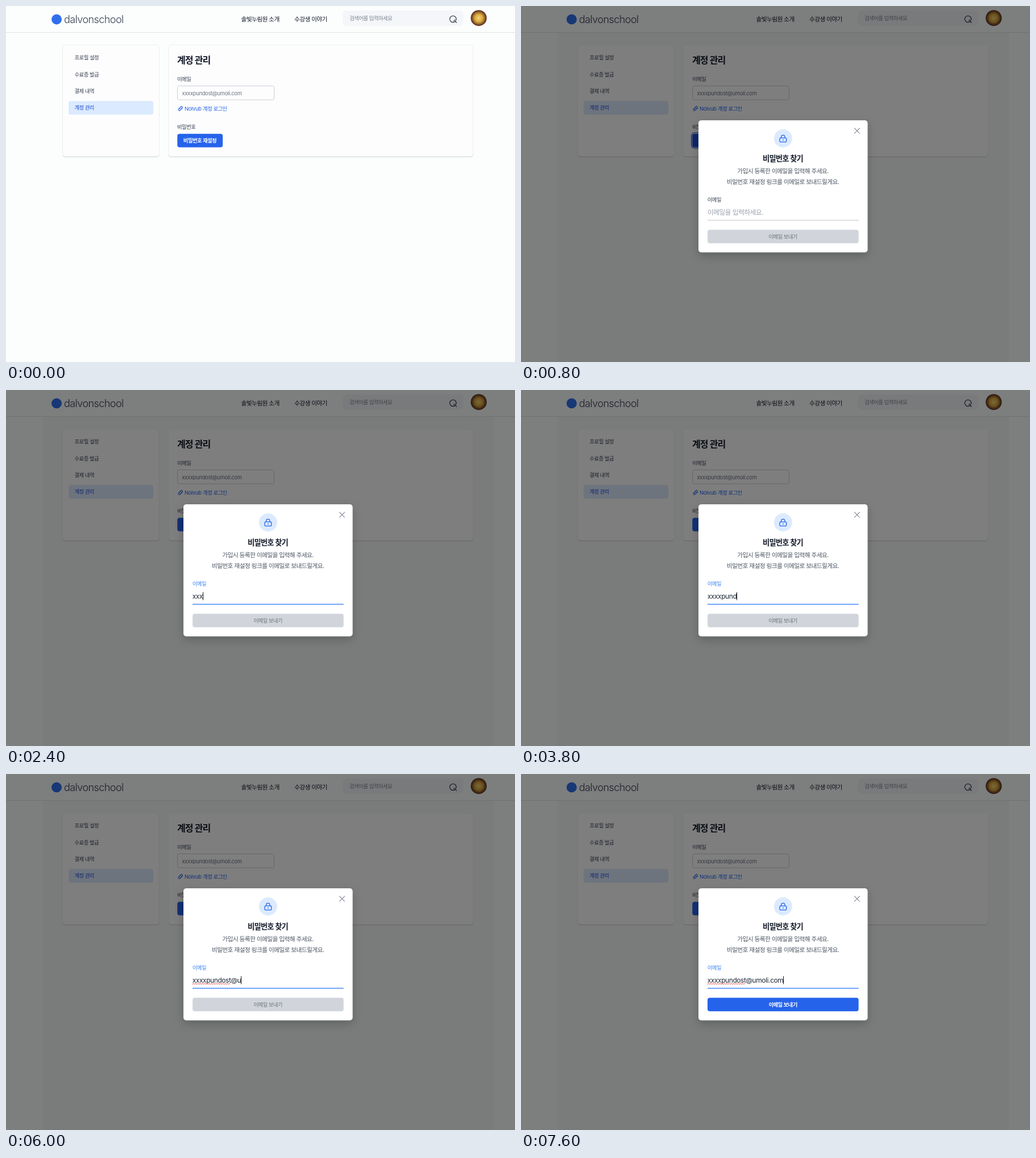
These frames come from a looping animation (895x626 px, 8 s). An HTML page:

```html
<!DOCTYPE html>
<html lang="ko">
<head>
<meta charset="utf-8">
<title>계정 관리</title>
<style>
html, body { margin: 0; width: 100%; height: 100%; overflow: hidden; background: #fcfdfd; }
svg { display: block; width: 895px; height: 626px; }
text {
  font: 9.35px Inter, "Noto Sans CJK KR", "Noto Sans CJK", sans-serif;
  letter-spacing: -.053em; fill: #374151;
}
.latin { letter-spacing: -.031em; }
.nav { font-size: 10.7px; font-weight: 500; fill: #111827; }
.desc { font-size: 10.7px; fill: #4b5563; }
.label { font-weight: 500; }
.bold { font-weight: 700; fill: #111827; }
.field { font-size: 11.9px; }
.mid { text-anchor: middle; }
.card { fill: #fdfdfe; stroke: #eeeff2; filter: drop-shadow(0 1px .5px #0002); }
.line { fill: none; stroke-linecap: round; stroke-linejoin: round; }
.modal { fill: #fff; filter: drop-shadow(0 6px 8px #0003); }
</style>
</head>
<body>
<svg viewBox="0 0 895 626">
  <defs>
    <radialGradient id="avatar">
      <stop offset="0" stop-color="#f1d677"/>
      <stop offset=".5" stop-color="#d9a63c"/>
      <stop offset="1" stop-color="#51261d"/>
    </radialGradient>
  </defs>
  <rect width="895" height="626" fill="#fcfdfd"/>
  <rect id="column" x="65" y="47" width="793" height="579" fill="#000" opacity=".025"/>

  <!-- header -->
  <path d="M0 46.5H895" stroke="#dfe1e5"/>
  <circle cx="89" cy="23.5" r="9" fill="#2f6fed"/>
  <text class="latin" x="102" y="29.5" style="font-size:18px;font-weight:300">dalvonschool</text>
  <text class="nav" x="413.5" y="26.5">솔빛누림원 소개</text>
  <text class="nav" x="507" y="26.5">수강생 이야기</text>
  <rect x="592" y="8" width="212" height="27" rx="6" fill="#f4f6f9"/>
  <text x="604" y="24.7" style="fill:#7d8590">검색어를 입력하세요</text>
  <g class="line" stroke="#374151" stroke-width="1.2">
    <circle cx="786" cy="23" r="5.7"/>
    <path d="M790 27L792.3 29.3M787 26.2A3.4 3.4 0 0 0 789.3 23.8"/>
  </g>
  <circle cx="831.2" cy="21.2" r="14" fill="url(#avatar)"/>

  <!-- side menu -->
  <rect class="card" x="99.5" y="68.5" width="170" height="196" rx="5"/>
  <rect x="110" y="167" width="149" height="24" rx="4" fill="#dbeafe"/>
  <text x="120.5" y="94.3">프로필 설정</text>
  <text x="120.5" y="123.7">수료증 발급</text>
  <text x="120.5" y="153">결제 내역</text>
  <text class="label" x="120.5" y="182.3" style="fill:#1d4ed8">계정 관리</text>

  <!-- account panel -->
  <rect class="card" x="285.5" y="68.5" width="536" height="196" rx="5"/>
  <text class="bold" x="301" y="100.5" style="font-size:16px">계정 관리</text>
  <text class="label" x="301" y="131.5">이메일</text>
  <rect x="301.5" y="140.5" width="170" height="24.5" rx="3" fill="#fdfdfe" stroke="#cbced4"/>
  <text class="latin" x="309.5" y="156.5" style="fill:#6b7280">xxxxpundost@umoli.com</text>
  <g class="line" stroke="#2563eb" stroke-width="1.1" transform="translate(306.8 180.3) rotate(-45)">
    <path d="M-1 -1.9H-2.6A1.9 1.9 0 0 0 -2.6 1.9H-.2A1.9 1.9 0 0 0 1.5 -.3"/>
    <path d="M1 1.9H2.6A1.9 1.9 0 0 0 2.6 -1.9H.2A1.9 1.9 0 0 0 -1.5 .3"/>
  </g>
  <text class="latin" x="314" y="183.6" style="fill:#2563eb">Nolvub <tspan style="letter-spacing:-.053em">계정 로그인</tspan></text>
  <text class="label" x="301" y="215.8">비밀번호</text>
  <rect id="ring" x="299.7" y="222.9" width="83" height="27.2" rx="5.5" fill="#fff" stroke="#2563eb" stroke-width="1.4"/>
  <rect id="reset" x="301.3" y="224.8" width="79.8" height="23.6" rx="4"/>
  <text class="bold mid" x="341" y="240.1" style="fill:#fff">비밀번호 재설정</text>

  <!-- dialog -->
  <g id="dialog">
    <rect width="895" height="626" opacity=".5"/>
    <rect class="modal" x="312" y="201" width="297.5" height="232.3" rx="5"/>
    <path class="line" d="M586.5 215L595.3 223.8M595.3 215L586.5 223.8" stroke="#8b919d" stroke-width="1.2"/>
    <circle cx="460.8" cy="232.7" r="16" fill="#dbeafe"/>
    <g class="line" stroke="#2563eb" stroke-width="1.3">
      <rect x="455" y="231.8" width="11.6" height="7.4" rx="1.4"/>
      <path d="M457.6 231.6V230.4A3.2 3.2 0 0 1 464 230.4V231.6M460.8 235V236"/>
    </g>
    <text class="bold mid" x="460.5" y="273.2" style="font-size:13.2px">비밀번호 찾기</text>
    <text class="desc mid" x="460.5" y="294.4">가입시 등록한 이메일을 입력해 주세요.</text>
    <text class="desc mid" x="460.5" y="313.1">비밀번호 재설정 링크를 이메일로 보내드릴게요.</text>
    <text class="label" id="label" x="327.7" y="343.7">이메일</text>
    <text class="field" id="hint" x="327.7" y="367.2" style="fill:#9ca3af">이메일을 입력하세요.</text>
    <text class="field latin" id="typed" x="327.7" y="367" style="fill:#1f2937"></text>
    <path class="line" id="wave" stroke="#e5383b" stroke-width=".9"/>
    <rect id="caret" y="355.5" width="1" height="14" fill="#111"/>
    <rect id="underline" x="328" y="376" width="265.6" height="1.4"/>
    <rect id="send" x="328" y="393.4" width="265.6" height="23.8" rx="4"/>
    <text class="mid" id="sendText" x="460.6" y="408.7">이메일 보내기</text>
  </g>
</svg>
<script>
const $ = id => document.getElementById(id);
const show = (id, on) => { $(id).style.display = on ? '' : 'none'; };
const email = 'xxxxpundost@umoli.com';
const keyTimes = [1900, 2100, 2400, 2700, 3000, 3200, 3400, 3800, 4100, 4400, 4600,
  5600, 6000, 6400, 6500, 6700, 7000, 7100, 7400, 7500, 7600];
const LOOP = 8000, PRESS = 700, OPEN = 800, FOCUS = 1400, SPELL = 5600, VALID = 7500;
const LEFT = 327.7;

function textWidth(count) {
  return count ? $('typed').getSubStringLength(0, count) : 0;
}

function wavePath(width) {
  let d = `M${LEFT} 369.8`;
  for (let x = 2, i = 0; x <= width; x += 2, i++) d += `L${LEFT + x} ${i % 2 ? 369.8 : 368.2}`;
  return d;
}

function draw(t) {
  const focused = t >= FOCUS, pressed = t >= PRESS && !focused, valid = t >= VALID;
  show('dialog', t >= OPEN);
  show('column', t >= OPEN);
  show('ring', pressed);
  $('reset').style.fill = pressed ? '#1d4ed8' : '#2563eb';
  if (t < OPEN) return;

  const count = keyTimes.filter(k => k <= t).length;
  $('typed').textContent = email.slice(0, count);
  show('hint', !count);
  $('label').style.fill = focused ? '#3b82f6' : '#374151';
  $('underline').style.fill = focused ? '#3b82f6' : '#d1d5db';

  // the caret goes dark half a second after the last key
  const lastKey = count ? keyTimes[count - 1] : FOCUS;
  show('caret', focused && t - lastKey < 500);
  $('caret').setAttribute('x', Math.round(LEFT + textWidth(count)));

  show('wave', t >= SPELL);
  if (t >= SPELL) $('wave').setAttribute('d', wavePath(textWidth(email.indexOf('@'))));

  $('send').style.fill = valid ? '#2563eb' : '#d1d5db';
  $('sendText').style.fill = valid ? '#fff' : '#6b7280';
  $('sendText').style.fontWeight = valid ? 700 : 400;
}

const start = performance.now();
function tick() {
  draw((performance.now() - start) % LOOP);
  requestAnimationFrame(tick);
}
tick();
</script>
</body>
</html>
```
